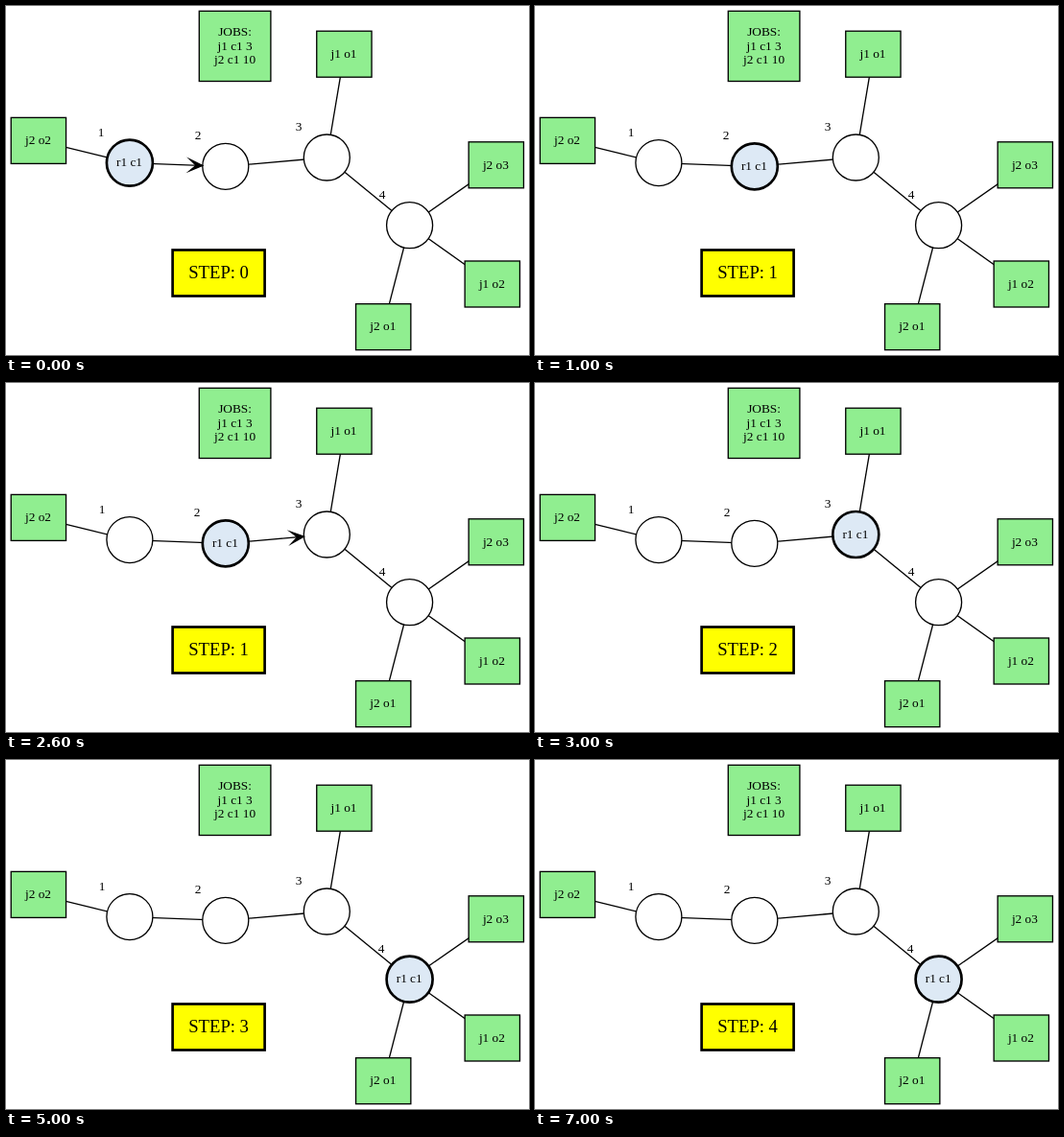
An HTML page that plays this animation: 545x364 px, repeating every 8000 ms.

```html
<!DOCTYPE html>
<html lang="en">
<head>
<meta charset="utf-8">
<title>Robot on a graph</title>
<style>
  html, body { margin: 0; width: 100%; height: 100%; overflow: hidden; background: #fff; }
  svg { display: block; }
  text { font: 13.333px "Liberation Serif", Times, serif; text-anchor: middle; }
  .edge, .box, .node { stroke: #000; stroke-width: 1.333; }
  .box { fill: #90ee90; }
  .node { fill: #fff; }
  .node.busy { fill: #dde9f5; stroke-width: 2.667; }
  .arrow { stroke: #000; stroke-width: 1.333; stroke-miterlimit: 10; }
  .step { fill: #ff0; stroke-width: 2.667; }
  .count { font-size: 18.667px; }
</style>
</head>
<body>
<svg id="stage" width="545" height="364" viewBox="0 0 545 364"></svg>
<script>
const LOOP = 8000;
const R = 24;
const nodes = [[128.9, 163.6], [228.8, 167.3], [334.3, 158], [420.6, 228.7]];
// centre, label, node it hangs on
const stations = [
  [33.9, 140.4, "j2 o2", 0],
  [352.4, 50.2, "j1 o1", 2],
  [510.8, 165.8, "j2 o3", 3],
  [506.8, 290, "j1 o2", 3],
  [393.2, 334.7, "j2 o1", 3]
];
// start time, robot node, step counter, arrow shown
const states = [
  [0, 0, 0, true],
  [1000, 1, 1, false],
  [2000, 1, 1, true],
  [3000, 2, 2, false],
  [4000, 2, 2, true],
  [5000, 3, 3, false],
  [7000, 3, 4, false]
];

const stage = document.getElementById("stage");

function add(tag, attrs, content = "") {
  const el = document.createElementNS("http://www.w3.org/2000/svg", tag);
  for (const key in attrs) el.setAttribute(key, attrs[key]);
  el.textContent = content;
  return stage.appendChild(el);
}

const text = (x, y, content, cls = "") => add("text", { x, y, class: cls }, content);

const line = ([x1, y1], [x2, y2]) => add("line", { x1, y1, x2, y2, class: "edge" });

const box = (cx, cy, width, height, cls) =>
  add("rect", { x: cx - width / 2, y: cy - height / 2, width, height, class: "box " + cls });

// Swept-back head whose tip touches the next circle
function arrowPoints(from, to) {
  const dx = to[0] - from[0], dy = to[1] - from[1], d = Math.hypot(dx, dy);
  const ux = dx / d, uy = dy / d;
  const at = (back, side) =>
    [to[0] - ux * (R + back) - uy * side, to[1] - uy * (R + back) + ux * side];
  return [at(0, 0), at(13.333, 6), at(6.667, 0), at(13.333, -6)].join(" ");
}

nodes.slice(1).forEach((p, i) => line(nodes[i], p));
stations.forEach(([x, y, , n]) => line([x, y], nodes[n]));

stations.forEach(([x, y, label]) => {
  box(x, y, 57.3, 48, "");
  text(x - 0.4, y + 3.7, label);
});

box(238.6, 41.9, 74.6, 73.2, "");
["JOBS:", "j1 c1 3", "j2 c1 10"].forEach((s, i) => text(238.6, 31 + i * 14.6, s));

box(221.6, 278.5, 96, 48, "step");
const count = text(221.6, 284.3, "", "count");

const circles = nodes.map(([cx, cy]) => add("circle", { cx, cy, r: R, class: "node" }));
const tags = nodes.map(([x, y], i) => text(x - 29, Math.floor(y - 27.5), i + 1));
const robot = text(0, 0, "r1 c1");
const arrow = add("polygon", { class: "arrow" });

function draw(time) {
  const [, at, step, moving] = states.filter(s => s[0] <= time).pop();
  circles.forEach((c, i) => c.classList.toggle("busy", i === at));
  // the thicker outline pushes its tag slightly left
  tags.forEach((t, i) => t.setAttribute("x", Math.round(nodes[i][0] - 29 - (i === at ? 0.7 : 0))));
  robot.setAttribute("x", nodes[at][0] - 0.4);
  robot.setAttribute("y", nodes[at][1] + 3.7);
  count.textContent = "STEP: " + step;
  arrow.setAttribute("points", moving ? arrowPoints(nodes[at], nodes[at + 1]) : "");
}

const start = performance.now();
function tick() {
  draw((performance.now() - start) % LOOP);
  requestAnimationFrame(tick);
}
tick();
</script>
</body>
</html>
```
